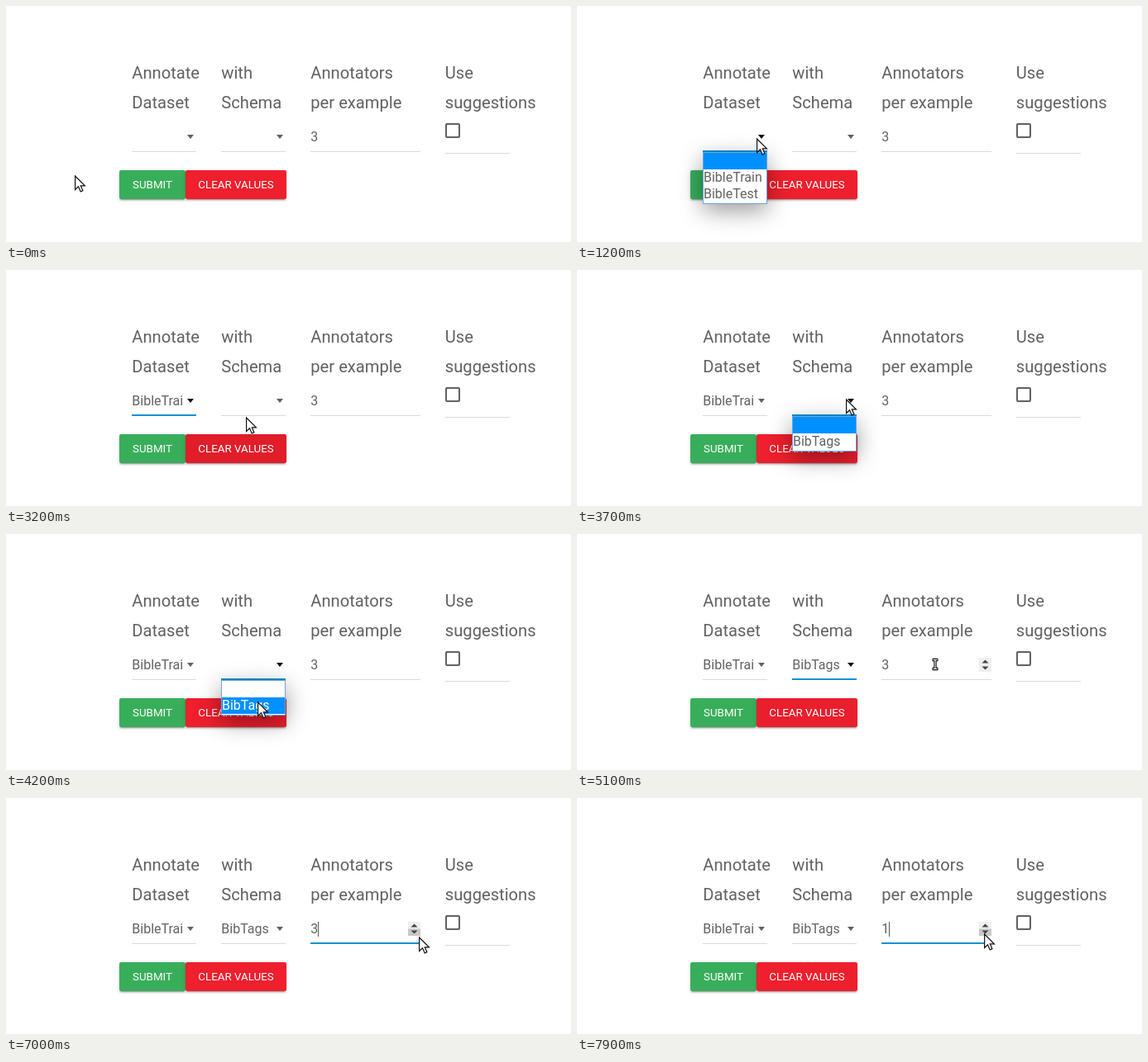
Animation of 683x286 px, one loop 8 s. Source, as an HTML page:

```html
<!DOCTYPE html>
<html lang="en">
<head>
<meta charset="utf-8">
<title>Annotation form</title>
<style>
  html, body { margin: 0; width: 100%; height: 100%; overflow: hidden; background: #fff; }
  body { position: relative; font: 16px/20px Roboto, sans-serif; color: #616161; }
  body * { position: absolute; box-sizing: border-box; white-space: pre; }
  .label { top: 63px; font-size: 20.16px; line-height: 36px; }
  .value { top: 149px; }
  .line { top: 176px; height: 1px; background: #dadada; }
  .line.focus { top: 175px; height: 2px; background: #0b90d8; }
  .arrow { top: 156px; width: 8px; height: 5px; background: #616161; clip-path: polygon(0 0, 100% 0, 50% 100%); }
  .arrow.focus { background: #111; }
  .button {
    top: 199px; height: 35px; border-radius: 2px; color: #fff;
    font-size: 13.333px; line-height: 35px; text-align: center;
    box-shadow: 0 2px 2px rgba(0,0,0,.14), 0 1px 5px rgba(0,0,0,.12), 0 3px 1px -2px rgba(0,0,0,.2);
  }
  .popup {
    top: 177px; width: 78px; padding-bottom: 1px; border: 1px solid #6ba5de; background: #fff;
    box-shadow: 0 8px 28px rgba(0,0,0,.4);
  }
  .popup div { position: static; height: 20px; }
  .popup .active { background: #0090ff; color: #fff; }
  #checkbox { left: 531px; top: 142px; width: 18px; height: 18px; border: 2px solid #616161; border-radius: 2px; }
  #caret { left: 377px; top: 150px; width: 1px; height: 18px; background: #555; }
  svg { left: 0; top: 0; overflow: visible; }
</style>
</head>
<body>
<script>
const LOOP = 8000, STEP = 100;

// Pointer moves: start and end time, then the place reached
const pointerStart = [84, 206];
const moves = [
  [0, 800, 249, 157],
  [1100, 1200, 218, 161],
  [1700, 2100, 219, 206],
  [2500, 2600, 229, 204],
  [2900, 3200, 291, 179],
  [3200, 3500, 326, 157],
  [3700, 4200, 305, 204],
  [4700, 5200, 440, 156],
  [5800, 6200, 459, 160],
  [6700, 7000, 500, 169],
  [7100, 7200, 493, 165]
];

function add(className, style = {}, text = '', parent = document.body) {
  const el = document.createElement('div');
  el.className = className;
  el.textContent = text;
  Object.assign(el.style, style);
  return parent.appendChild(el);
}
const px = n => n + 'px';
const show = (el, visible) => el.style.visibility = visible ? 'visible' : 'hidden';
const clamp = n => Math.max(0, Math.min(1, n));

function field(x, width, label) {
  add('label', { left: px(x + .3) }, label);
  return {
    line: add('line', { left: px(x), width: px(width) }),
    value: add('value', { left: px(x + .3) })
  };
}

function select(x, label, options, times) {
  const { line, value } = field(x, 78, label);
  const arrow = add('arrow', { left: px(x + 67) });
  return { x, line, value, arrow, options, ...times };
}

const selects = [
  select(152, 'Annotate\nDataset', ['', 'BibleTrain', 'BibleTest'], { open: 1200, close: 2900, blur: 3700 }),
  select(260, 'with\nSchema', ['', 'BibTags'], { open: 3700, close: 4700, blur: 5400 })
];
const number = field(368, 133, 'Annotators\nper example');
const suggestions = field(530.5, 78, 'Use\nsuggestions');
suggestions.line.style.top = '178px';
add('').id = 'checkbox';
const caret = add('');
caret.id = 'caret';

add('button', { left: '137px', width: '80px', background: '#38ae5b' }, 'SUBMIT');
const clear = add('button', { left: '217px', width: '122px' }, 'CLEAR VALUES');

for (const s of selects) {
  s.popup = add('popup', { left: px(s.x) });
  s.rows = s.options.map(option => add('', {}, option, s.popup));
}

document.body.insertAdjacentHTML('beforeend', `
<svg width="683" height="286">
  <g id="spinner">
    <path fill="#efefef" d="M486 150h15v17h-15z"/>
    <path id="down" fill="#c8c8c8" d="M486 158.500h15v8.500h-15z"/>
    <path fill="#444" d="M489.500 156.500l4-4 4 4zM489.500 160.500l4 4 4-4z"/>
  </g>
  <g id="pointer">
    <path id="hand" fill="#fff" stroke="#111" stroke-width="1.200"
      d="M-.4 0V16.500L3.500 12.800 6.200 18.900 8.900 17.700 6.300 11.800H11.400z"/>
    <g id="beam" fill="none">
      <path stroke="#111" stroke-width="3.400" d="M-3.500-5.500h7M0-5.500v11M-3.500 5.500h7"/>
      <path stroke="#fff" stroke-width="1.100" d="M-2.500-5.500h5M0-5.500v11M-2.500 5.500h5"/>
    </g>
  </g>
</svg>`);
const [spinner, down, pointer, hand, beam] =
  ['spinner', 'down', 'pointer', 'hand', 'beam'].map(id => document.getElementById(id));

function pointerAt(t) {
  let [x, y] = pointerStart;
  for (const [start, end, toX, toY] of moves) {
    const k = Math.sin(clamp((t - start) / (end - start)) * Math.PI / 2);
    x += (toX - x) * k;
    y += (toY - y) * k;
  }
  return [x, y];
}

// Button hover: full from start, fading over the last 300 ms
const hover = (t, start, end) => t < start ? 0 : clamp((end - t) / 300);

function draw(t) {
  const [x, y] = pointerAt(t);

  for (const s of selects) {
    const focused = t >= s.open && t < s.blur;
    s.line.classList.toggle('focus', focused);
    s.arrow.classList.toggle('focus', focused);
    s.value.textContent = t >= s.close ? s.options[1].slice(0, 9) : '';
    s.popup.style.display = t >= s.open && t < s.close ? 'block' : 'none';
    const active = Math.max(0, Math.floor((y - 178) / 20));
    s.rows.forEach((row, i) => row.classList.toggle('active', i === active));
  }

  const dark = Math.max(hover(t, 2900, 3500), hover(t, 4700, 5200));
  clear.style.background = `rgb(${239 - 15 * dark}, ${31 - 2 * dark}, ${45 - 4 * dark})`;

  number.line.classList.toggle('focus', t >= 5400);
  number.value.textContent = t < 7600 ? 3 : t < 7800 ? 2 : 1;
  show(caret, t >= 7600 || t >= 5400 && (t - 5400) % 1200 < 600);
  show(spinner, t >= 5000);
  show(down, x > 486 && y > 158);

  const overText = x > 368 && x < 486 && y > 136 && y < 177;
  show(hand, !overText);
  show(beam, overText);
  pointer.setAttribute('transform', `translate(${Math.round(x)} ${Math.round(y)})`);
}

function tick() {
  draw(Math.floor(performance.now() % LOOP / STEP) * STEP);
  requestAnimationFrame(tick);
}
tick();
</script>
</body>
</html>
```
